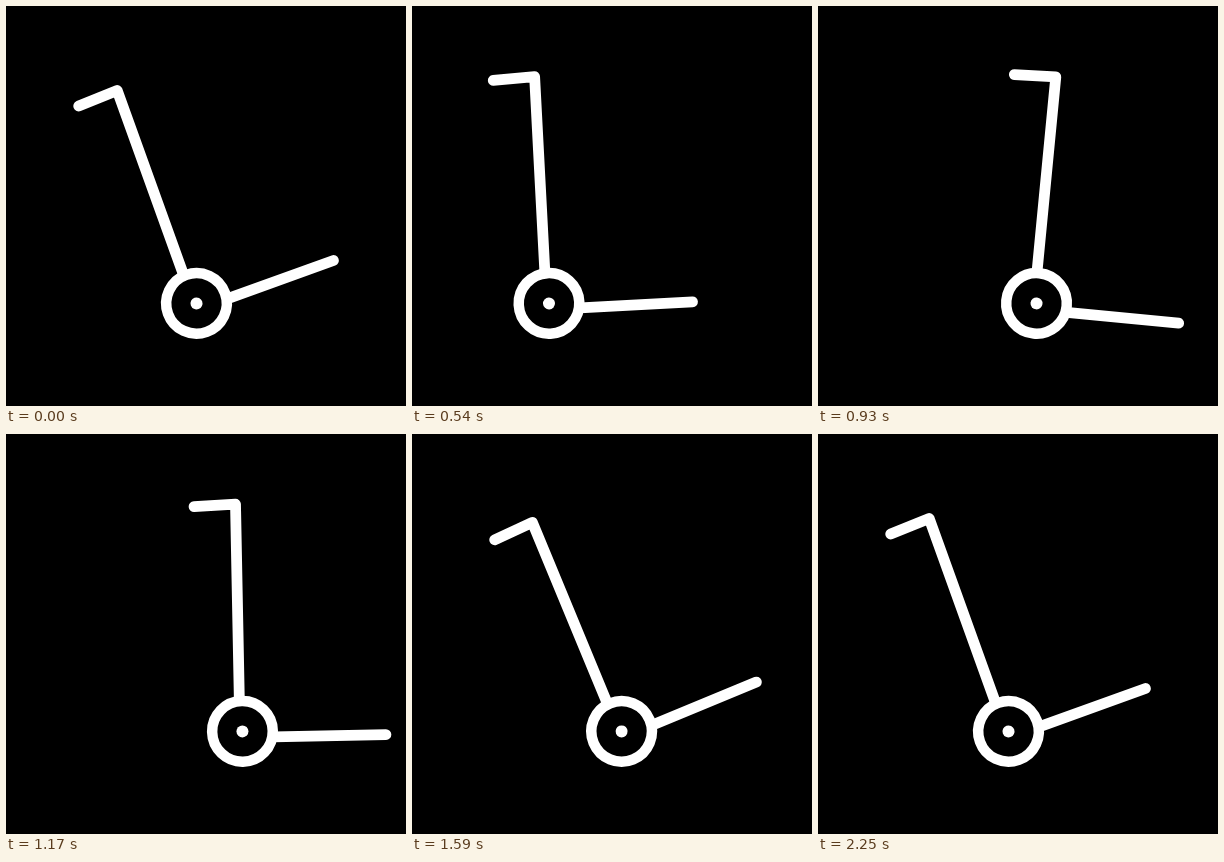
Write an HTML page that moves like this. It is 400x400 px and loops after 2280 ms.

```html
<!DOCTYPE html>
<html lang="en">
<head>
<meta charset="utf-8">
<title>Hand truck</title>
<style>
  html, body { margin: 0; width: 100%; height: 100%; overflow: hidden; background: #000; }
  svg { display: block; width: 100%; height: 100%; }
</style>
</head>
<body>
<svg viewBox="0 0 400 400">
  <rect width="400" height="400" fill="#000"/>
  <g id="truck" fill="none" stroke="#fff" stroke-width="10.8" stroke-linecap="round" stroke-linejoin="round">
    <path d="M-44 -225.6 L-2.5 -227.3 V-31"/>
    <path d="M31 6 H143.4"/>
    <circle r="30.3" stroke-width="10.5"/>
    <circle r="6" fill="#fff" stroke="none"/>
  </g>
</svg>
<script>
const STEP = 30, LOOP = 2280, CYCLE = 75;

// Knots: [time in steps, value]
const roll = [[0, 190.5], [11, 134], [14, 129], [18, 137], [23, 163], [31, 218.5],
              [36, 232.5], [40, 237], [45, 234], [54, 206.5], [62, 184], [72, 190.6]];
const tilt = [[0, -19.8], [11, -11], [18, -3], [23, 2.4], [31, 5.5],
              [45, -9.5], [54, -23.6], [62, -27], [72, -21.5]];

// Smooth curve through the knots that closes on itself after one cycle
function loopCurve(knots) {
  const n = knots.length;
  const gap = i => (knots[(i + 1) % n][0] - knots[i][0] + CYCLE) % CYCLE;
  const rate = i => (knots[(i + 1) % n][1] - knots[i][1]) / gap(i);
  const slopes = knots.map((_, i) => {
    const p = (i + n - 1) % n;
    return (rate(p) * gap(i) + rate(i) * gap(p)) / (gap(p) + gap(i));
  });
  return time => {
    const t = time % CYCLE;
    let i = n - 1;
    while (knots[i][0] > t) i--;
    const j = (i + 1) % n, h = gap(i), u = (t - knots[i][0]) / h, v = 1 - u;
    return (1 + 2 * u) * v * v * knots[i][1] + u * v * v * h * slopes[i]
         + u * u * (3 - 2 * u) * knots[j][1] - u * u * v * h * slopes[j];
  };
}

const rollAt = loopCurve(roll), tiltAt = loopCurve(tilt);
const truck = document.getElementById('truck');

function draw(ms) {
  const step = Math.floor((ms % LOOP) / STEP);
  truck.setAttribute('transform',
    `translate(${rollAt(step).toFixed(2)} 297.4) rotate(${tiltAt(step).toFixed(2)})`);
}

const start = performance.now();
function tick() {
  draw(performance.now() - start);
  requestAnimationFrame(tick);
}
tick();
</script>
</body>
</html>
```
